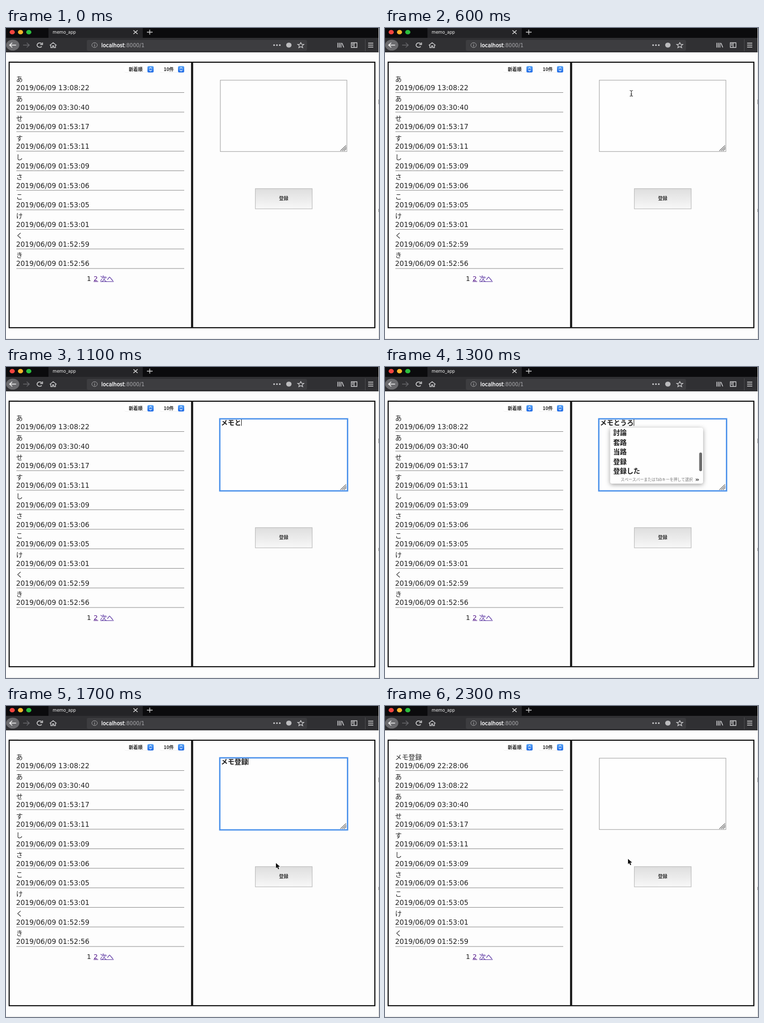
Animation of 720x600 px, one loop 2400 ms. Source, as an HTML page with a canvas:

```html
<!DOCTYPE html>
<html lang="ja">
<head>
<meta charset="utf-8">
<style>
html, body { margin: 0; width: 100%; height: 100%; overflow: hidden; background: #fdfdfd; }
canvas { display: block; width: 720px; height: 600px; filter: blur(.45px); }
</style>
</head>
<body>
<canvas id="stage" width="720" height="600"></canvas>
<script>
const ctx = document.getElementById('stage').getContext('2d');
const LATIN = '"DejaVu Sans", sans-serif';
const JP = '"Noto Sans CJK JP", "Noto Sans CJK", sans-serif';
const LOOP = 2400, STEP = 100, ROW = 37.72;

const memos = [
  ['メモ登録', '22:28:06'],
  ['あ', '13:08:22'], ['あ', '03:30:40'], ['せ', '01:53:17'], ['す', '01:53:11'],
  ['し', '01:53:09'], ['さ', '01:53:06'], ['こ', '01:53:05'], ['け', '01:53:01'],
  ['く', '01:52:59'], ['き', '01:52:56']
];
const choices = ['討論', '套路', '当路', '登録', '登録した'];
const typed = [[900, 'メ'], [1000, 'メモ'], [1100, 'メモと'], [1200, 'メモとう'],
  [1300, 'メモとうろ'], [1400, 'メモとうろく'], [1500, 'メモ登録']];

function text(s, x, y, size, color, font = JP, weight = 500) {
  ctx.font = `${weight} ${size}px ${font}`;
  ctx.fillStyle = color;
  ctx.fillText(s, x, y);
  return ctx.measureText(s).width;
}

function rect(x, y, w, h, color) {
  ctx.fillStyle = color;
  ctx.fillRect(x, y, w, h);
}

function round(x, y, w, h, r, color) {
  ctx.beginPath();
  ctx.roundRect(x, y, w, h, r);
  ctx.fillStyle = color;
  ctx.fill();
}

function oval(x, y, rx, ry, color) {
  ctx.beginPath();
  ctx.ellipse(x, y, rx, ry, 0, 0, Math.PI * 2);
  ctx.fillStyle = color;
  ctx.fill();
}

function box(x, y, w, h, color, width = 1) {
  ctx.strokeStyle = color;
  ctx.lineWidth = width;
  ctx.strokeRect(x, y, w, h);
}

function path(d, color, width = 1.3, x = 0, y = 0) {
  ctx.save();
  ctx.translate(x, y);
  ctx.strokeStyle = color;
  ctx.lineWidth = width;
  ctx.stroke(new Path2D(d));
  ctx.restore();
}

function drawBrowser(saved, loading) {
  const icon = '#cfcfd1';
  rect(0, 0, 719, 19, '#0b0b0d');
  rect(82, 0, 182, 19, '#242427');
  if (loading) rect(82, 0, 111, 19, '#1c3350');
  rect(0, 19, 719, 28, '#303033');
  oval(12, 8, 5, 4.3, '#f4453f');
  oval(28, 8, 5, 4.3, '#f6b42c');
  oval(44, 8, 5, 4.3, '#2cbe3e');
  text('memo_app', 90, 11, 8.1, '#f4f4f4', LATIN, 400);
  path('M-4-3.5L4 3.5M4-3.5L-4 3.5', '#e0e0e0', 1.4, 250, 8);
  path('M-5.5 0H5.5M0-4.7V4.7', '#d0d0d0', 1.4, 277.5, 8);

  oval(13, 33, 12.7, 10.6, '#6b6b6e');
  path('M6.5 0H-6M-1-4.5L-6 0L-1 4.5', '#f2f2f2', 1.5, 13, 33);
  path('M-6 0H6M1-4.5L6 0L1 4.5', '#66666a', 1.4, 39, 33);
  if (loading) path('M-5-4.5L5 4.5M5-4.5L-5 4.5', '#66666a', 1.4, 65, 33);
  else path('M4 2.6A5 4.3 0 1 1 4-2.6M5.5-5V-1H1', icon, 1.6, 65, 33);
  path('M-6.5 .5L0-4.7L6.5 .5M-4.5 0V4.8H-1.2V1.5H1.2V4.8H4.5V0', icon, 1.4, 91, 33);

  round(156, 23, 425, 21, 3, '#3d3d40');
  ctx.beginPath();
  ctx.ellipse(171, 33, 5.3, 4.7, 0, 0, 7);
  ctx.strokeStyle = '#a0a0a2';
  ctx.lineWidth = 1;
  ctx.stroke();
  path('M0-2.6V-1.4M0-.5V2.7', '#b0b0b2', 1.2, 171, 33);
  const w = text('localhost', 184, 36.8, 10, '#f8f8f9', LATIN, 400);
  ctx.strokeStyle = '#f8f8f9';
  ctx.lineWidth = .4;
  ctx.strokeText('localhost', 184, 36.8);
  text(saved ? ':8000' : ':8000/1', 184 + w, 36.8, 10, '#a8a8ab', LATIN, 400);
  for (const x of [517.5, 523, 528.5]) oval(x, 33, 1.7, 1.5, icon);
  oval(546, 33, 5.2, 4.8, '#bcbcbe');
  path('M0-5L1.7-1.7L6-1.4L2.7 1.2L3.8 5L0 2.9L-3.8 5L-2.7 1.2L-6-1.4L-1.7-1.7Z', icon, 1.2, 569, 33);
  path('M-5.5-4.5V4.8M-2.5-4.5V4.8M.5-4.5V4.8M2.5-4L6 4.5', icon, 1.5, 646, 33);
  path('M-5.5-4.5H5.5V4.5H-5.5ZM0-4.5V4.5M-4-2H-1.5M-4 .5H-1.5', icon, 1.3, 672, 33);
  path('M693.5 22V45', '#4b4b4e', 1);
  path('M-5-3.8H5M-5 0H5M-5 3.8H5', icon, 1.5, 704, 33);
}

function drawSelect(label, x, right, tx) {
  round(x, 74, right - x, 12.3, 3, '#e9e9e9');
  round(x, 73, right - x, 12.5, 3, '#ffffff');
  text(label, tx, 82.7, 8.9, '#222', JP, 700);
  const g = ctx.createLinearGradient(0, 73, 0, 86);
  g.addColorStop(0, '#58a5f6');
  g.addColorStop(1, '#1d68e6');
  round(right - 12, 73.5, 12, 12.3, 2.5, g);
  path('M-2.5-1.2L0-3.4L2.5-1.2M-2.5 1.2L0 3.4L2.5 1.2', '#fff', 1.1, right - 6, 79.6);
}

function drawList(saved) {
  box(6.1, 66, 352.2, 512.2, '#0c0c0c', 2.1);
  box(360.2, 66, 351.8, 512.2, '#0c0c0c', 2.1);
  drawSelect('新着順', 229, 285, 237);
  drawSelect('10件', 297, 344, 304.5);
  const first = saved ? 0 : 1;
  for (let i = 0; i < 10; i++) {
    const [name, time] = memos[i + first], y = i * ROW;
    text(name, 19.5, 103.4 + y, 12.9, '#222', JP, 500);
    text('2019/06/09 ' + time, 19.5, 120 + y, 13.4, '#222', LATIN, 400);
    rect(20, 124 + y, 324, 1, '#8c8c8c');
  }
  text('1', 156, 488, 13, '#222', LATIN, 400);
  text('2', 169, 488, 13, '#551a8b', LATIN, 400);
  text('次へ', 181.5, 488, 13, '#50289c', JP, 400);
  rect(169, 488.7, 9, 1, '#551a8b');
  rect(182, 488.7, 26, 1, '#50289c');
}

function drawPopup() {
  ctx.save();
  ctx.shadowColor = 'rgba(0,0,0,.38)';
  ctx.shadowBlur = 8;
  ctx.shadowOffsetY = 2;
  round(434.5, 117, 179.5, 108, 4, '#fefefe');
  ctx.restore();
  choices.forEach((s, i) => text(s, 440.5, 131.3 + i * 18.45, 13, '#1a1a1a', JP, 700));
  text('スペースバーまたはTabキーを押して選択', 455, 220, 7.45, '#777', JP, 400);
  path('M0-2L2.3 0L0 2M3-2L5.3 0L3 2', '#444', 1.2, 600, 217.5);
  round(606.5, 165, 5.5, 36, 2.7, '#6c6c6c');
}

function drawForm(t) {
  const focus = t >= 700 && t < 1900;
  rect(413, 100, 246, 139, '#fefefe');
  if (focus) box(412.7, 100, 246.6, 139, '#4b91ea', 2.6);
  else box(413.7, 100.7, 244.3, 137.6, '#a6a6a6', 1.1);
  path('M645.5 237L656.5 226.5M649 237L657 229.5M652.5 237L657 232.5', '#777', 1.2);

  const g = ctx.createLinearGradient(0, 310, 0, 349);
  g.addColorStop(0, '#dedede');
  g.addColorStop(1, '#f8f8f8');
  rect(481, 310, 110, 39, g);
  box(481.3, 309.9, 109.7, 39, '#b4b4b4');
  text('登録', 527, 332.3, 9, '#333', JP, 700);

  if (!focus) return;
  const entry = typed.filter(e => e[0] <= t).pop();
  if (entry) {
    const w = text(entry[1], 415, 111.8, 13, '#1a1a1a', JP, 700);
    rect(415 + w, 101, 1, 12.5, '#222');
  }
  if (t >= 1200 && t < 1500) drawPopup();
}

function beam(x, y) {
  path('M-3-5.5Q0-5.5 0-3.5Q0-5.5 3-5.5M0-4V4M-3 5.5Q0 5.5 0 3.5Q0 5.5 3 5.5M-1.5 1.5H1.5', '#333', 1.1, x, y);
}

function arrow(x, y) {
  const p = new Path2D('M0 0V10L2.5 8L4.3 12L6.2 11.2L4.5 7.3L8 7Z');
  ctx.save();
  ctx.translate(x, y);
  ctx.strokeStyle = '#fff';
  ctx.lineWidth = 1.4;
  ctx.stroke(p);
  ctx.fillStyle = '#111';
  ctx.fill(p);
  ctx.restore();
}

function drawPointer(t) {
  if (t >= 600 && t < 900) beam(475.5, 126);
  else if (t === 1600) beam(498, 215);
  else if (t === 1700) arrow(521, 303);
  else if (t >= 1800) {
    const k = Math.max(0, (t - 2000) / 300), e = k * k * (3 - 2 * k);
    arrow(532 - 63 * e, 334 - 39 * e);
  }
}

function draw(t) {
  const saved = t >= 1900;
  rect(0, 0, 720, 600, '#fdfdfd');
  rect(719, 0, 1, 600, '#d8d8d8');
  rect(719, 138, 1, 9, '#777');
  rect(719, 349, 1, 6, '#777');
  rect(0, 598.5, 720, 1.5, '#ededed');
  rect(5, 63, 19, 1, '#d4d4d4');
  drawBrowser(saved, t === 1900);
  drawList(saved);
  drawForm(t);
  drawPointer(t);
}

const start = performance.now();
function tick(now) {
  const t = Math.max(0, now - start) % LOOP;
  draw(Math.floor(t / STEP) * STEP);
  requestAnimationFrame(tick);
}
draw(0);
requestAnimationFrame(tick);
</script>
</body>
</html>
```
